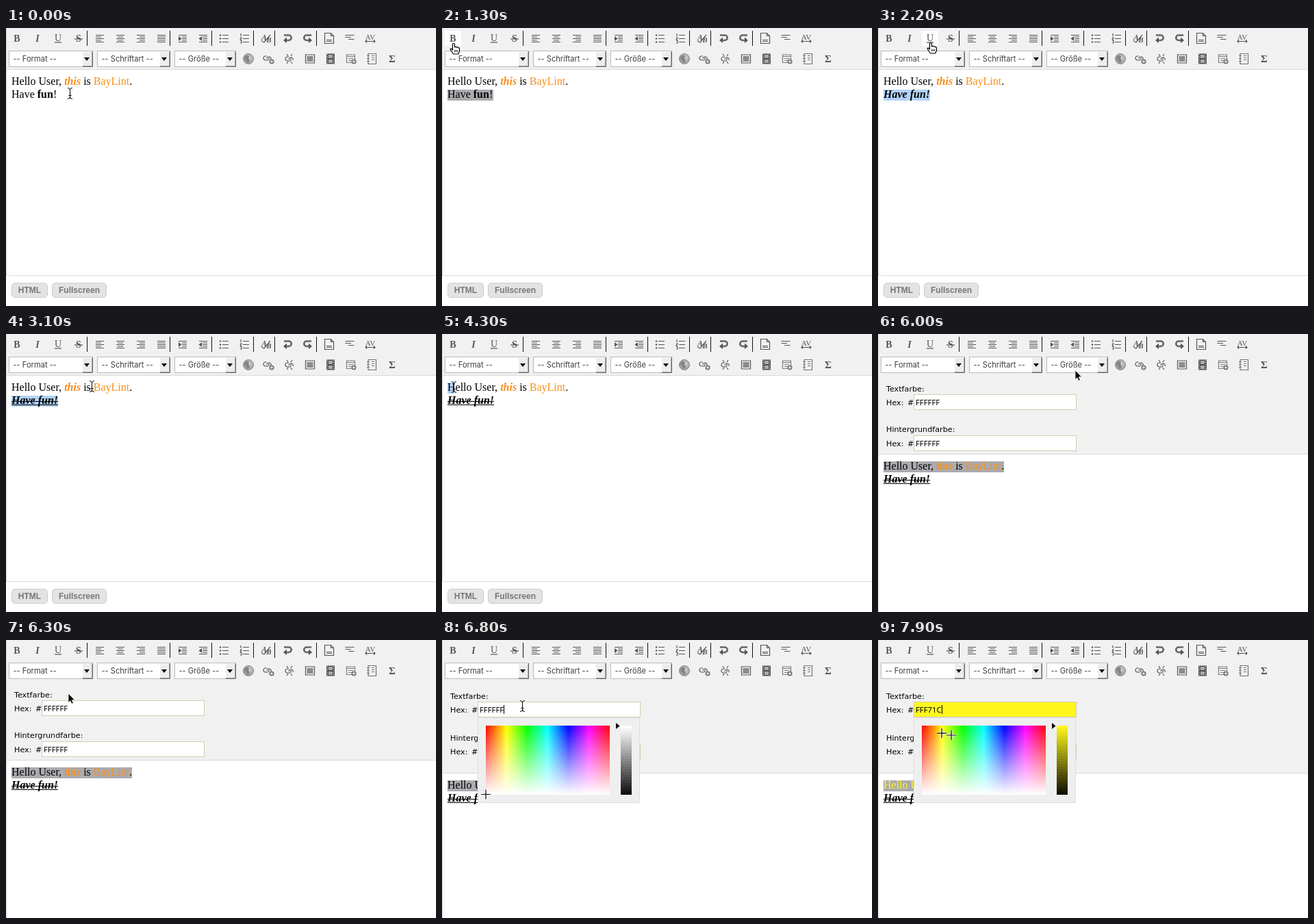
An HTML page for the animation above (8000 ms loop, 628 by 406 pixels).

```html
<!DOCTYPE html>
<html lang="de">
<head>
<meta charset="utf-8">
<title>Editor</title>
<style>
html, body { margin: 0; width: 100%; height: 100%; overflow: hidden; background: #fff; }
svg { display: block; width: 628px; height: 406px; }
text { white-space: pre; }
.doc { font-family: "Liberation Serif", serif; font-size: 16px; }
.ui { font: 11.1px Inter, sans-serif; fill: #3c3c3c; }
.label { font: 11.2px "DejaVu Sans", sans-serif; fill: #000; }
.hex { font: 11.3px "Noto Sans", sans-serif; fill: #000; }
.btn { font: bold 12px "Liberation Sans", sans-serif; fill: #777; }
.glyph { font: bold 14px "Liberation Serif", serif; fill: #555; text-anchor: middle; }
.bi { font-weight: bold; font-style: italic; }
.ink { fill: none; stroke: #555; stroke-width: 1.2; }
.thick { stroke-width: 2.6; stroke: #666; }
.solid { fill: #555; }
</style>
</head>
<body>
<svg id="stage" viewBox="0 0 628 406" width="628" height="406"></svg>
<script>
const LOOP = 8000, STEP = 100;
const ORANGE = '#f7901e', BLUE = '#b3d3f8', GREY = '#ababaf';
const stage = document.getElementById('stage');

const rect = (x, y, w, h, fill, more = '') =>
  `<rect x="${x}" y="${y}" width="${w}" height="${h}" fill="${fill}" ${more}/>`;
const path = (d, cls = 'ink') => `<path class="${cls}" d="${d}"/>`;
const text = (x, y, cls, s, more = '') => `<text x="${x}" y="${y}" class="${cls}" ${more}>${s}</text>`;
const at = (x, y, body) => `<g transform="translate(${x} ${y})">${body}</g>`;
const rows = (spans) => path(spans.map(([a, b], i) => `M${a} ${i * 2.5 - 4.5}H${b}`).join(''));

const W = [-6, 6];
const indent = dir => rows([W, [-1, 6], [-1, 6], [-1, 6], W]) +
  path(dir > 0 ? 'M-6 -3L-1.500 .5L-6 4Z' : 'M-2 -3L-6.500 .5L-2 4Z', 'solid');
const list = mark => path('M-2 -4.500H7M-2 .5H7M-2 5.500H7') + mark;
const turn = flip => `<g transform="scale(${flip} 1)">` +
  path('M-5 -4.500H2A3.700 3.700 0 0 1 2 3H-2', 'ink thick') + path('M-1 -1.500V7L-6 3Z', 'solid') + '</g>';
const link = path('M-1 -3H-3A3 3 0 0 0 -3 3H0A3 3 0 0 0 2 -1M-1 1A3 3 0 0 1 2 -2H3A3 3 0 0 1 5 2', 'ink');
const plus = at(4, 4, '<circle r="3.6" fill="#777"/><path d="M-2 0H2M0 -2V2" stroke="#fff"/>');

const topIcons = [
  [16, text(0, 5, 'glyph', 'B')],
  [46, text(0, 5, 'glyph bi', 'I')],
  [76, text(0, 4, 'glyph', 'U', 'style="font-weight:normal"') + path('M-5 6H5')],
  [106, text(0, 5, 'glyph', 'S') + path('M-6 1H6')],
  [137, rows([W, [-6, 2], W, [-6, 2], W])],
  [167, rows([W, [-4, 4], W, [-4, 4], W])],
  [197, rows([W, [-2, 6], W, [-2, 6], W])],
  [227, rows([W, W, W, W, W])],
  [258, indent(1)],
  [288, indent(-1)],
  [318, list([-4.5, .5, 5.5].map(y => `<circle cx="-5" cy="${y}" r="1.2" class="solid"/>`).join(''))],
  [348, list(path('M-5 -7V-3M-6 -1H-4L-6 2H-4M-6 3.500H-4V7H-6'))],
  [380, text(-3, 3, 'glyph bi', 'A', 'style="font-size:12px"') + text(4, 6, 'glyph bi', 'B', 'style="font-size:11px"') +
    path('M-7 4L-3 6L6 -5', 'ink')],
  [411, turn(1)],
  [441, turn(-1)],
  [472, path('M-6.500 -7.500H2.500L6.500 -3.500V7.500H-6.500Z') + path('M2.500 -7.500V-3.500H6.500M-4 2.500H4M-4 4.500H4')],
  [502, path('M-6.500 -4.500H6.500M-6.500 -1.500H2M-2 1.500H6.500')],
  [532, text(0, 2, 'glyph', 'AV', 'style="font-size:11px;font-weight:normal"') + path('M-7 4.500H7M-5 2.500L-7 4.500L-5 6.500M5 2.500L7 4.500L5 6.500')]
];
const lowIcons = [
  [354, '<circle r="7.500" fill="url(#globe)" stroke="#888"/>' +
    '<path d="M-5 -4Q0 -7 1 -3Q-1 0 2 2Q1 6 -2 5Q-3 1 -6 0Z" fill="#858585"/>'],
  [384, at(-2, -1, link) + plus],
  [414, link + path('M-4 -7L-2 -4M4 -7L2 -4M-4 7L-2 4M4 7L2 4')],
  [444, path('M-6.500 -6H6.500V6H-6.500Z') + rect(-4.5, -4, 9, 8, '#8b8b8b')],
  [474, rect(-6, -7.5, 12, 15, '#4c4c4c') + rect(-3, -6, 6, 5, '#aaa') + rect(-3, 1, 6, 5, '#aaa') +
    '<path d="M-4.500 -7V8M4.500 -7V8" stroke="#ddd" stroke-dasharray="1.500 1.500"/>'],
  [504, '<g opacity=".75">' + path('M-6.500 -6H5.500V5.500H-6.500ZM-6.500 -3.500H5.500M-4 -.5H3M-4 2.500H1') + '</g>' + plus],
  [534, '<g opacity=".8">' + path('M-5 -7.500H6.500V7.500H-5ZM-7 -4.500H-3M-7 -.5H-3M-7 3.500H-3M0 -4.500H4M0 -1.500H4M0 1.500H4') + '</g>'],
  [564, text(0, 5, 'glyph', 'Σ', 'style="font-size:15px"')]
];

const select = (x, w, label) =>
  rect(x + .5, 33.5, w - 1, 23, '#fff', 'stroke="#b9b9b9"') +
  text(x + 6.5, 49, 'ui', label) +
  rect(x + w - 16, 34, 15, 22, '#ededed') +
  `<path d="M${x + w - 15.5} 56V34.500H${x + w - 1}" fill="none" stroke="#fff"/>` +
  `<path d="M${x + w - 15} 56.500H${x + w - .5}V34" fill="none" stroke="#666"/>` +
  `<path d="M${x + w - 15} 55.500H${x + w - 1.5}V35" fill="none" stroke="#aaa"/>` +
  `<path d="M${x + w - 13} 43h8l-4 5z"/>`;
const button = (x, w, label) =>
  rect(x + .5, 372.5, w - 1, 21, '#e3e3e3', 'rx="4.500" stroke="#cdcdcd"') +
  text(x + w / 2, 387, 'btn', label, 'text-anchor="middle"');
const field = (id, y) => rect(52.5, y, 237, 22, '#fff', `id="${id}" stroke="#d3ccb2"`);
const cross = 'M-7 0H7M0 -7V7';
const hair = `<path d="${cross}" stroke="#fff" stroke-width="3"/><path d="${cross}" stroke="#000" stroke-width="1.200"/>`;

const hues = Array.from({ length: 7 }, (_, i) =>
  `<stop offset="${i / 6}" stop-color="hsl(${i * 60} 100% 50%)"/>`).join('');
const slices = Array.from({ length: 26 }, (_, i) =>
  rect(261, 125 + i * 4, 16, i < 25 ? 4 : 1, '#000', `fill-opacity="${i / 26}"`)).join('');

stage.innerHTML = `
<defs>
  <linearGradient id="hue">${hues}</linearGradient>
  <linearGradient id="fade" x2="0" y2="1">
    <stop stop-color="#fff" stop-opacity="0"/><stop offset="1" stop-color="#fff"/>
  </linearGradient>
  <radialGradient id="globe" cx=".6" cy=".4">
    <stop stop-color="#d0d0d0"/><stop offset="1" stop-color="#a0a0a0"/>
  </radialGradient>
</defs>
${rect(0, 0, 628, 406, '#fff')}
<g id="page">
  ${rect(0, 61, 1, 300, '#d2d2d2')}${rect(0, 361, 628, 1, '#dcdcdc')}
  ${rect(8, 71, 0, 16, BLUE, 'id="sel1"')}${rect(8, 90, 0, 16, BLUE, 'id="sel2"')}
  <text id="line1" class="doc" x="8" y="83">Hello User, <tspan class="bi" fill="${ORANGE}">this</tspan> is <tspan fill="${ORANGE}">BayLint</tspan>.</text>
  <text id="line2" class="doc" x="8" y="102"><tspan id="have">Have </tspan><tspan font-weight="bold">fun</tspan><tspan id="bang">!</tspan></text>
  <path id="under" d="M8 103.500H76" stroke="#000"/>
  <path id="strike" d="M8 98.500H76" stroke="#000"/>
  ${button(8, 53, 'HTML')}${button(67, 80, 'Fullscreen')}
</g>
<rect id="bar" width="628" height="60" fill="#f1f1f1"/>
<rect id="edge" width="628" height="1" fill="#d9d9d9"/>
<rect id="side" width="1" height="60" fill="#d2d2d2"/>
<rect id="hover" y="4" width="24" height="22" fill="#fdfdfd"/>
${[118, 239, 300, 361, 392, 453].map(x => rect(x, 4, 1, 22, '#111')).join('')}
${topIcons.map(([x, s]) => at(x, 15, s)).join('')}
${select(4, 123, '-- Format --')}${select(133, 107, '-- Schriftart --')}${select(246, 90, '-- Größe --')}
${lowIcons.map(([x, s]) => at(x, 45, s)).join('')}
<g id="panel">
  <g id="fg">${text(12, 84, 'label', 'Textfarbe:')}${text(12, 104, 'label', 'Hex:')}${text(43, 104, 'label', '#')}
    ${field('box', 88.5)}${text(55, 104, 'hex', 'FFFFFF', 'id="code"')}
    ${rect(91, 93, 1, 13, '#000', 'id="caret"')}</g>
  <g id="bgHead">${text(12, 143, 'label', 'Hintergrundfarbe:')}</g>
  <g id="bgRow">${text(12, 164, 'label', 'Hex:')}${text(43, 164, 'label', '#')}
    ${field('box2', 148.5)}${text(55, 164, 'hex', 'FFFFFF')}</g>
</g>
<g id="picker">
  ${rect(52.5, 113.5, 236, 124, '#efefef', 'stroke="#dedede"')}
  ${rect(64, 125, 181, 101, 'url(#hue)')}${rect(64, 125, 181, 101, 'url(#fade)')}
  ${rect(261, 125, 16, 101, '#fff', 'id="tint"')}${slices}
  <path d="M254 121L259.500 125.500L254 130Z"/>
  <g id="marker">${hair}</g>
</g>
<g id="mouse">
  <g id="beam"><path d="M-3 -8.500Q.5 -8 .5 -6Q.5 -8 4 -8.500M.5 -7V7M-3 7.500Q.5 7 .5 5Q.5 7 4 7.500M-1.500 2.500H2.500" fill="none" stroke="#000"/></g>
  <g id="hand"><path d="M-1.500 1.500Q0 -.5 1.500 1.500V6Q3 4.500 4.200 6.200Q5.800 5 6.600 7Q8.500 6.200 8.500 8.500V11.500L6.800 16H-.5L-4.800 9.500Q-4.800 7.500 -3 8.500L-1.500 10Z" fill="#fff" stroke="#000" stroke-width="1.200" stroke-linejoin="round"/>
    <path d="M1.500 10V13M3.500 10V13M5.500 10V13" stroke="#000" stroke-width=".9"/></g>
  <g id="arrow"><path d="M0 0V13.500L3 10.800L5 15.300L7.300 14.300L5.300 9.800H9.500Z" fill="#000" stroke="#fff" stroke-width=".8"/></g>
  <g id="hair">${hair}</g>
</g>`;

const el = {};
stage.querySelectorAll('[id]').forEach(n => el[n.id] = n);
const set = (id, attrs) => { for (const k in attrs) el[id].setAttribute(k, attrs[k]); };
const show = (id, on) => set(id, { visibility: on ? 'visible' : 'hidden' });
const move = (id, x, y) => set(id, { transform: `translate(${x} ${y})` });

// time, x, y, and the pointer shape from then on
const track = [
  [0, 93, 96, 'beam'], [200, 76, 97, 'beam'], [500, 8, 97, 'beam'], [700, 9, 92, 'arrow'],
  [1000, 15, 27, 'hand'], [1300, 17, 22, 'hand'], [1500, 17, 22, 'hand'], [1800, 47, 21, 'hand'],
  [2000, 47, 21, 'hand'], [2200, 77, 21, 'hand'], [2400, 77, 21, 'hand'], [2600, 107, 21, 'hand'],
  [2800, 107, 22, 'arrow'], [3000, 120, 64, 'beam'], [3100, 125, 77, 'beam'], [3500, 288, 80, 'beam'],
  [3700, 280, 79, 'beam'], [4200, 12, 78, 'beam'], [4500, 28, 78, 'beam'], [4700, 28, 78, 'beam'],
  [5200, 236, 67, 'beam'], [5300, 236, 67, 'beam'], [5400, 300, 52, 'arrow'], [5500, 352, 44, 'hand'],
  [5700, 354, 45, 'hand'], [5900, 354, 45, 'arrow'], [6300, 91, 78, 'arrow'], [6500, 112, 97, 'beam'],
  [6800, 117, 97, 'beam'], [7000, 108, 118, 'arrow'], [7100, 92, 140, 'hair'], [7300, 76, 170, 'hair'],
  [7600, 84, 146, 'hair'], [7800, 93.1, 136.1, 'hair'], [7900, 107, 139, 'hair']
];

function pointer(t) {
  let i = track.length - 1;
  while (i && track[i][0] > t) i--;
  const a = track[i], b = track[i + 1] || a;
  const k = b === a ? 0 : (t - a[0]) / (b[0] - a[0]);
  return { x: a[1] + (b[1] - a[1]) * k, y: a[2] + (b[2] - a[2]) * k, shape: a[3] };
}

function mix(hue, sat) {
  const part = n => {
    const k = (n + hue / 60) % 6;
    return 255 * (1 - sat * Math.max(0, Math.min(k, 4 - k, 1)));
  };
  return [5, 3, 1].map(n => Math.round(part(n)).toString(16).padStart(2, '0')).join('').toUpperCase();
}

function draw(t) {
  const p = pointer(t);
  const open = t >= 5900, pick = t >= 6600, picked = t >= 7400;
  const drop = pick ? 134 : open ? 115 : 0;

  move('mouse', Math.round(p.x), Math.round(p.y));
  ['beam', 'hand', 'arrow', 'hair'].forEach(s => show(s, s === p.shape));
  const over = t >= 1000 && t < 2800 && p.y < 28;
  show('hover', over);
  set('hover', { x: 4 + 30 * Math.max(0, Math.round((p.x - 16) / 30)) });

  move('page', 0, drop);
  set('bar', { height: 60 + drop });
  set('side', { height: 60 + drop });
  set('edge', { y: 60 + drop });

  // second line: drag left, then bold, italic, underline, strike
  const end = t >= 1400 ? 76 : 75;
  const start = t < 200 ? end : Math.min(end, Math.max(8, t < 500 ? p.x : 8));
  set('sel2', { x: start, width: t < 4200 ? end - start : 0, fill: t >= 1100 && t < 1400 ? GREY : BLUE });
  ['have', 'bang'].forEach(id => set(id, { 'font-weight': t >= 1400 ? 'bold' : 'normal' }));
  set('line2', { 'font-style': t >= 1900 ? 'italic' : 'normal' });
  show('under', t >= 2300);
  show('strike', t >= 2700);

  // first line: drag right
  const reach = t < 4200 ? 8 : t < 5200 ? Math.min(184, Math.max(8, p.x)) : 184;
  set('sel1', { width: reach - 8, fill: open ? GREY : BLUE });

  show('panel', open);
  show('picker', pick);
  show('caret', pick);
  move('fg', 0, pick ? 2 : 0);
  move('bgHead', 0, pick ? 4 : 0);
  move('bgRow', 0, pick ? 3 : 0);

  const m = picked ? pointer(t - STEP) : { x: 64, y: 225.5 };
  const code = picked ? mix((m.x - 64) / 181 * 360, 1 - (m.y - 125) / 101) : 'FFFFFF';
  move('marker', m.x, m.y);
  set('tint', { fill: '#' + code });
  set('box', { fill: '#' + code });
  set('line1', { fill: picked ? '#' + code : '#000' });
  el.code.textContent = code;
  if (pick) set('caret', { x: Math.round(55 + el.code.getComputedTextLength()) });
}

const begin = performance.now();
function frame() {
  const t = (performance.now() - begin) % LOOP;
  draw(Math.floor(t / STEP) * STEP);
  requestAnimationFrame(frame);
}
frame();
</script>
</body>
</html>
```
